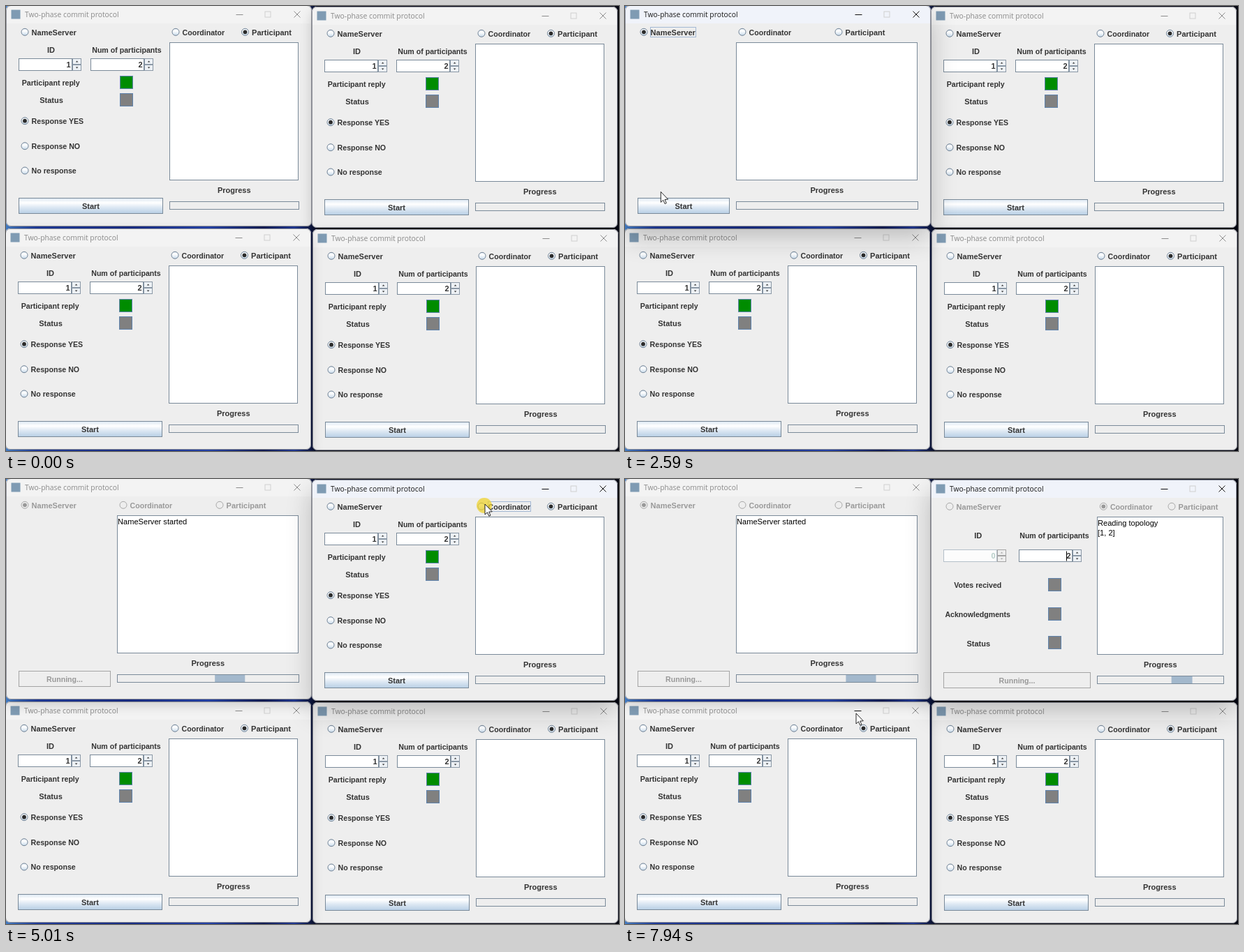
An HTML page for the animation above (8 s loop, 878 by 638 pixels).

```html
<!DOCTYPE html>
<html lang="en">
<head>
<meta charset="utf-8">
<title>Two-phase commit protocol</title>
<style>
html, body { margin: 0; width: 100%; height: 100%; overflow: hidden; }
#stage {
  position: relative; width: 878px; height: 638px; overflow: hidden;
  background: linear-gradient(90deg, #4a86d0 0, #2443ae 5%, #1c3396 20%, #2a4cc0 33%, #14205f 42%, #2540a8 47%, #080b1c 51%, #060813 100%);
}
.win {
  position: absolute; width: 438px; height: 317px; border-radius: 7px;
  overflow: hidden; background: #eee;
  box-shadow: 0 7px 18px rgba(0,0,0,.18);
}
.win::after {
  content: ""; position: absolute; inset: 0; border-radius: 7px;
  border: 1px solid rgba(40,45,62,.45);
}
.win.active { box-shadow: 0 16px 36px rgba(0,0,0,.23); }
svg { position: absolute; left: 0; top: 0; display: block; }
text { font: bold 11px "Liberation Sans", Arial, sans-serif; fill: #333; }
text.n { font-size: 10.6px; }
text.mid { text-anchor: middle; }
text.end { text-anchor: end; }
text.off { fill: #999; }
text.faint { fill: #b5cdc8; }
text.log { font-weight: normal; font-size: 11.1px; fill: #000; }
text.title { font: 10.35px "Open Sans", "Noto Sans", sans-serif; fill: #8a8a8a; }
.active text.title { fill: #191919; }
.bar { fill: #f3f3f3; }
.active .bar { fill: #f0f3fa; }
.ctl { fill: none; stroke: #8c8c8c; }
.active .ctl, .ctl.hot { stroke: #111; }
.max { fill: none; stroke: #d0d0d0; }
.line { fill: none; stroke: #7a8a99; }
.field { fill: #fff; stroke: #7a8a99; }
.pale { fill: #fcfcfc; stroke: #b4bfc9; }
.step { fill: #edf1f5; stroke: #8b98a6; }
.btn { fill: url(#ocean); stroke: #7a8a99; }
.down { fill: #b8cfe5; stroke: #7a8a99; }
.dead { fill: #eee; stroke: #a4a4a4; }
.focus { fill: none; stroke: #a3b8d4; }
.chunk { fill: #a3b8cc; }
#top { z-index: 20; }
</style>
</head>
<body>
<div id="stage">
  <svg id="top" width="878" height="638">
    <defs>
      <linearGradient id="ocean" x1="0" y1="0" x2="0" y2="1">
        <stop offset="0" stop-color="#dde8f3"/><stop offset=".3" stop-color="#fff"/>
        <stop offset=".6" stop-color="#dde8f3"/><stop offset="1" stop-color="#b8cfe5"/>
      </linearGradient>
      <linearGradient id="bead" x1="0" y1="0" x2="0" y2="1">
        <stop offset="0" stop-color="#e4edf6"/><stop offset=".35" stop-color="#fff"/>
        <stop offset="1" stop-color="#c6d9ea"/>
      </linearGradient>
    </defs>
    <circle id="halo" r="11" fill="#f0d22a" fill-opacity=".72"/>
    <path id="arrow" d="M0 0V15L3.4 11.8 5.8 17.2 8 16.2 5.7 11.1 10.3 10.8Z" fill="#fff" stroke="#111" stroke-width=".9"/>
  </svg>
</div>
<script>
const LOOP = 8000, SWING = 3052;
const stage = document.getElementById('stage');
const halo = document.getElementById('halo'), arrow = document.getElementById('arrow');

// Moments of the story, in ms
const T = {
  pick1: 1900, show1: 2120, press1: 2720, run1: 2945,
  pick2: 4800, show2: 5130, press2: 6600, run2: 6863, hover: 7900
};
const CLICKS = [[T.pick1, T.show1], [T.press1, 2900], [T.pick2, T.show2], [T.press2, 6810]];

// Pointer: time, x, y
const PATH = [
  [70, 788, 597], [160, 745, 545], [300, 570, 390], [460, 260, 190], [600, 60, 75],
  [700, 2, 34], [820, 23, 23], [910, 32, 29], [1000, 43, 37], [1100, 46, 40],
  [2160, 46, 40], [2260, 46, 75], [2420, 48, 190], [2520, 50, 250], [2590, 51, 266],
  [2650, 70, 288], [2720, 82, 295], [3000, 84, 295], [3200, 85, 279], [3510, 85, 279],
  [3600, 170, 255], [3720, 330, 200], [3850, 480, 135], [4000, 600, 80], [4180, 668, 45],
  [4320, 686, 36], [5420, 686, 36], [5560, 672, 70], [5760, 620, 165], [5960, 575, 240],
  [6170, 564, 265], [6300, 564, 265], [6480, 570, 290], [6560, 572, 295], [7040, 572, 295],
  [7200, 545, 300], [7450, 460, 304], [7700, 380, 306], [7800, 352, 307], [7870, 336, 325], [7940, 331, 336]
];

const text = (x, y, s, cls = '') => `<text x="${x}" y="${y}" class="${cls}">${s}</text>`;
const rect = (x, y, w, h, cls) => `<rect x="${x}" y="${y}" width="${w}" height="${h}" class="${cls}"/>`;

function radio(x, y, label, { on = false, off = false, focus = 0, cls = '' } = {}) {
  const ring = off ? '#a8a8a8' : '#6f8194';
  return `<circle cx="${x}" cy="${y}" r="5" fill="${off ? '#eee' : 'url(#bead)'}" stroke="${ring}"/>` +
    (on ? `<circle cx="${x}" cy="${y}" r="2.9" fill="${off ? '#999' : '#2b2b2b'}"/>` : '') +
    text(x + 9.6, y + 4.2, label, cls + (off ? ' off' : '')) +
    (focus ? rect(x + 9.5, y - 6.8, focus, 14, 'focus') : '');
}

function spin(x, y, value, off = false) {
  const box = off ? 'pale' : 'field', step = off ? 'dead' : 'step', ink = off ? '#aaa' : '#333';
  return rect(x + .5, y + .5, 76, 17, box) + text(x + 74.5, y + 13.3, value, 'end' + (off ? ' faint' : '')) +
    rect(x + 77.5, y + .5, 12, 8, step) + rect(x + 77.5, y + 9.5, 12, 8, step) +
    `<path d="M${x + 81.8} ${y + 5.6}h3.6l-1.8-2zM${x + 81.8} ${y + 12.6}h3.6l-1.8 2z" fill="${ink}"/>`;
}

const lamp = (x, y, color) =>
  `<rect x="${x - 9}" y="${y - 9}" width="18" height="18" fill="${color}" stroke="#5f83ad"/>`;

function button(w, mode) {
  const cls = { idle: 'btn', press: 'down', run: 'dead' }[mode];
  return rect(18.5, 275.5, w, 22, cls) +
    text(18.5 + w / 2, 291, mode === 'run' ? 'Running...' : 'Start', mode === 'run' ? 'mid n off' : 'mid');
}

// Log area, progress label and progress bar share a left edge
function output(x, lines = []) {
  return rect(x, 52.5, 418 - x + .5, 197, 'field') +
    lines.map((s, i) => text(x + .5, 65 + i * 14, s, 'log')).join('') +
    text((x + 419) / 2, 267.7, 'Progress', 'mid') +
    '<g class="slot"></g>' + rect(x, 280.5, 419.5 - x, 11, 'line');
}

function participant(focus) {
  return radio(27, 37.3, 'NameServer', { focus: focus === 'name' && 65 }) +
    radio(243, 37.3, 'Coordinator', { focus: focus === 'coord' && 61, cls: 'n' }) +
    radio(342.5, 37.3, 'Participant', { on: true }) +
    text(64.5, 67, 'ID', 'mid') + text(173, 67, 'Num of participants', 'mid n') +
    spin(18, 75, 1) + spin(121, 75, 2) +
    text(22.7, 114, 'Participant reply', 'n') + lamp(172.5, 109.5, '#008c00') +
    text(65, 139, 'Status', 'mid') + lamp(172.5, 134.5, '#808080') +
    radio(27, 164.7, 'Response YES', { on: true, cls: 'n' }) +
    radio(27, 200.7, 'Response NO', { cls: 'n' }) +
    radio(27, 236, 'No response', { cls: 'n' }) +
    button(206, 'idle') + output(234.5);
}

function nameServer(mode) {
  const off = mode === 'run';
  return radio(27, 37.3, 'NameServer', { on: true, off, focus: mode === 'idle' && 65 }) +
    radio(168, 37.3, 'Coordinator', { off, cls: 'n' }) + radio(306, 37.3, 'Participant', { off }) +
    button(131, mode) + output(159.5, off ? ['NameServer started'] : []);
}

function coordinator(mode) {
  const off = mode === 'run';
  return radio(27, 37.3, 'NameServer', { off }) +
    radio(247.3, 37.3, 'Coordinator', { on: true, off, focus: mode === 'idle' && 61, cls: 'n' }) +
    radio(345, 37.3, 'Participant', { off }) +
    text(67.7, 83, 'ID', 'mid') + text(177, 83, 'Num of participants', 'mid n') +
    spin(18, 99, 0, true) + spin(126, 99, 2) +
    '<path class="caret" d="M194.5 101.5v14" stroke="#000" visibility="hidden"/>' +
    text(67.2, 154.3, 'Votes recived', 'mid n') + lamp(177.5, 149.5, '#808080') +
    text(67.2, 196, 'Acknowledgments', 'mid n') + lamp(177.5, 191.5, '#808080') +
    text(68.2, 237.7, 'Status', 'mid') + lamp(177.5, 232.5, '#808080') +
    button(210, mode) + output(238.5, off ? ['Reading topology', '[1, 2]'] : []);
}

function makeWindow(dx, dy, z) {
  const el = document.createElement('div');
  el.className = 'win';
  el.style.cssText = `left:${dx}px;top:${dy - 1}px;z-index:${z}`;
  el.innerHTML = '<svg width="438" height="318" viewBox="0 -1 438 318">' +
    rect(0, -1, 438, 26, 'bar') + '<rect x="7.5" y="5.5" width="13" height="13" fill="#7f9bb3"/>' +
    text(27, 16.2, 'Two-phase commit protocol', 'title') +
    '<path class="ctl min" d="M329.5 12.5h10"/>' + rect(371, 8, 8, 8, 'max') +
    '<path class="ctl" d="M412.5 7.5l9 9m0-9l-9 9"/><g class="view"></g></svg>';
  stage.appendChild(el);
  return { el, z, view: el.querySelector('.view'), key: null };
}

const wins = [makeWindow(0, 0, 1), makeWindow(438, 2, 2), makeWindow(-1, 320, 4), makeWindow(439, 321, 3)];

function show(win, key, draw) {
  if (win.key === key) return;
  win.key = key;
  win.view.innerHTML = draw();
}

function raise(win, active, z) {
  win.el.classList.toggle('active', active);
  win.el.style.zIndex = z;
}

// A block one sixth of the bar long bounces between its ends
function bounce(win, left, since, t) {
  const full = 418.5 - left, size = full / 6;
  const phase = (t - since) / SWING % 1;
  const x = left + (full - size) * (1 - Math.abs(1 - 2 * phase));
  win.view.querySelector('.slot').innerHTML = rect(x, 281, size, 10, 'chunk');
}

function pointer(t) {
  const i = PATH.findIndex(p => p[0] > t);
  if (i === 0) return null;
  if (i < 0) return PATH[PATH.length - 1].slice(1);
  const [a, ax, ay] = PATH[i - 1], [b, bx, by] = PATH[i];
  const k = (t - a) / (b - a);
  return [ax + (bx - ax) * k, ay + (by - ay) * k];
}

function render(t) {
  const [w1, w2, w3, w4] = wins;
  raise(w1, t >= T.pick1 && t < T.pick2, t < T.pick1 ? w1.z : 5);
  raise(w2, t >= T.pick2, t < T.pick2 ? w2.z : 6);

  if (t < T.show1) {
    const focus = t >= T.pick1 ? 'name' : '';
    show(w1, 'part' + focus, () => participant(focus));
  } else {
    const mode = t < T.press1 ? 'idle' : t < T.run1 ? 'press' : 'run';
    show(w1, mode, () => nameServer(mode));
    if (mode === 'run') bounce(w1, 160, T.run1, t);
  }

  if (t < T.show2) {
    const focus = t >= T.pick2 ? 'coord' : '';
    show(w2, 'part' + focus, () => participant(focus));
  } else {
    const mode = t < T.press2 ? 'idle' : t < T.run2 ? 'press' : 'run';
    show(w2, mode, () => coordinator(mode));
    if (mode === 'run') {
      bounce(w2, 239, T.run2, t);
      const lit = Math.floor((t - T.run2) / 500) % 2 === 0;
      w2.view.querySelector('.caret').setAttribute('visibility', lit ? 'visible' : 'hidden');
    }
  }

  show(w3, 'part', participant);
  show(w4, 'part', participant);
  w3.el.querySelector('.min').classList.toggle('hot', t >= T.hover);

  const at = pointer(t);
  arrow.style.display = at ? '' : 'none';
  halo.style.display = at && CLICKS.some(([a, b]) => t >= a && t < b) ? '' : 'none';
  if (at) {
    arrow.setAttribute('transform', `translate(${at[0]} ${at[1]})`);
    halo.setAttribute('transform', `translate(${at[0] - 1} ${at[1] + 2})`);
  }
}

const start = performance.now();
function tick() {
  render((performance.now() - start) % LOOP);
  requestAnimationFrame(tick);
}
tick();
</script>
</body>
</html>
```
